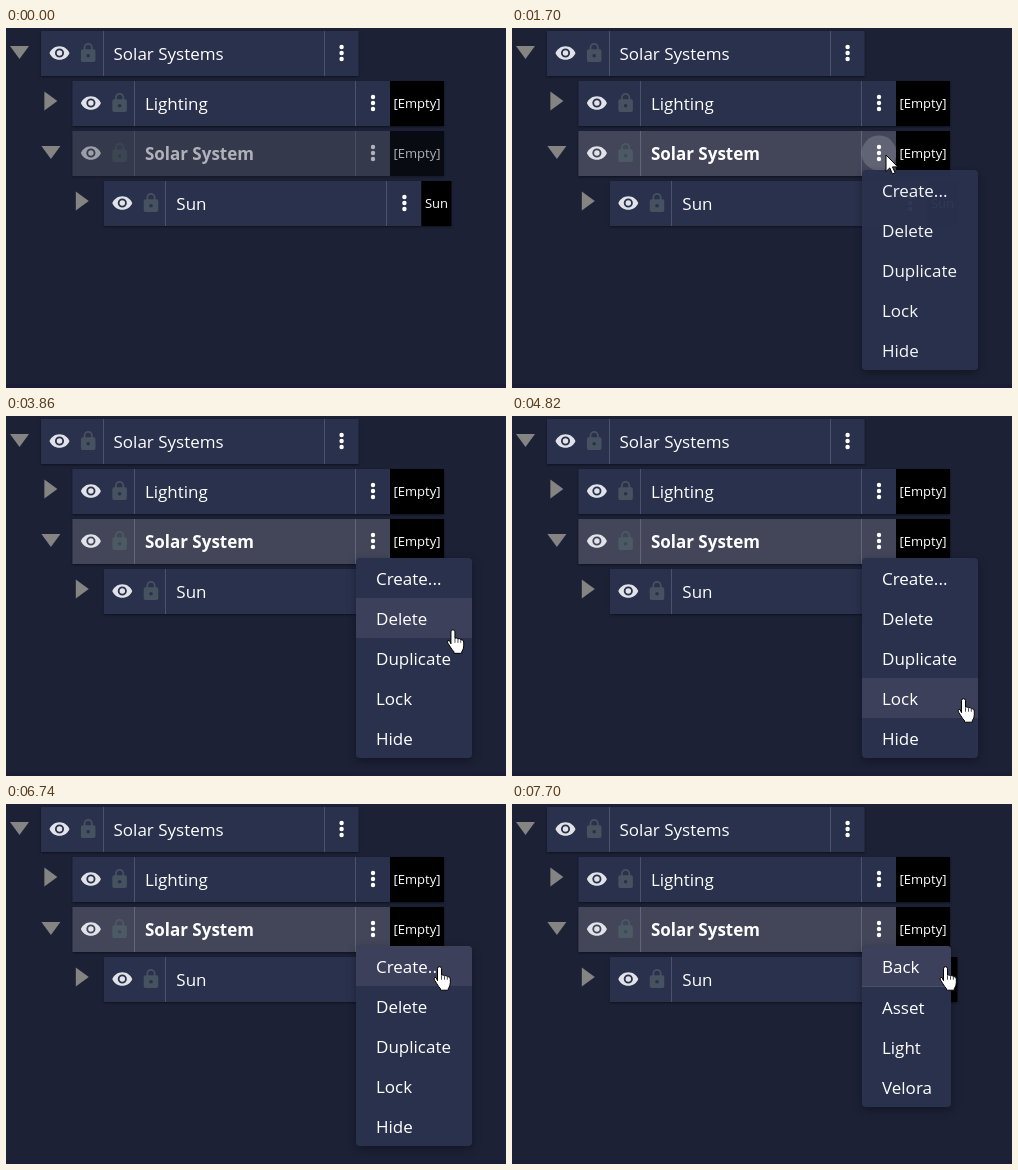
Animation, 500 px wide and 360 px high, one loop 8000 ms. Source, as an HTML page:

```html
<!DOCTYPE html>
<html lang="en">
<head>
<meta charset="utf-8">
<title>Scene tree menu</title>
<style>
html, body { margin: 0; width: 100%; height: 100%; overflow: hidden; background: #1c2136; }
svg { display: block; width: 500px; height: 360px; }
text { font: 500 17px "Open Sans", sans-serif; fill: #fff; white-space: pre; }
.bold { font-weight: 700; }
.tag { font-size: 13px; }
.row { filter: drop-shadow(0 1px 1px rgba(0, 0, 0, .45)); }
.menu { filter: drop-shadow(0 3px 4px rgba(0, 0, 0, .35)); }
.cursor path { fill: #fff; stroke: #000; stroke-linejoin: round; }
.cursor .lines { fill: none; stroke-width: .7; }
</style>
</head>
<body>
<svg id="stage" viewBox="0 0 500 360"></svg>
<script>
const LOOP = 8000, START = 500, STEP = 80;
const PANEL = '#2a314d', SELECTED = '#434659', HOVER = '#3c405a';
const ROW = { x: 35, y: 3, width: 317.6, height: 45, indent: 31.4, pitch: 50 };
const MENU = { x: 350, y: 142, item: 40 };

const EYE = 'M12 4.5C7 4.5 2.73 7.61 1 12c1.73 4.39 6 7.5 11 7.5s9.27-3.11 11-7.5c-1.73-4.39-6-7.5-11-7.5z' +
  'M12 17a5 5 0 1 1 0-10 5 5 0 0 1 0 10zM12 9a3 3 0 1 0 0 6 3 3 0 0 0 0-6z';
const LOCK = 'M18 8h-1V6A5 5 0 0 0 7 6v2H6a2 2 0 0 0-2 2v10a2 2 0 0 0 2 2h12a2 2 0 0 0 2-2V10a2 2 0 0 0-2-2z' +
  'M12 17a2 2 0 1 1 0-4 2 2 0 0 1 0 4zM15.1 8H8.9V6a3.1 3.1 0 0 1 6.2 0z';
const HAND = 'M-2 14V2a2 2 0 0 1 4 0V8.5q1.5-1 3 .6 1.7-.8 2.8.8 3-.4 3 2.3v4q0 3-2 5.8v1.5H1V22' +
  'q-2-2-4-5.5-2-3-2.5-4.2 0-2 2-1.6z';
const ARROW = 'M0 0V16.5l3.8-3.6 2.6 6 2.7-1.1-2.6-5.9h5.3z';

const rect = (x, y, w, h, fill, extra = '') =>
  `<rect x="${x}" y="${y}" width="${w}" height="${h}" fill="${fill}" ${extra}/>`;
const label = (x, y, text, cls = '') => `<text x="${x}" y="${y}" class="${cls}">${text}</text>`;
const icon = (d, cx, cy, fill) =>
  `<path d="${d}" fill="${fill}" fill-rule="evenodd" transform="translate(${cx} ${cy}) scale(.91) translate(-12 -12)"/>`;

function row({ depth, name, tag, tagWidth, open, selected }, index) {
  const x = ROW.x + depth * ROW.indent, right = x + ROW.width;
  const y = ROW.y + index * ROW.pitch, mid = y + 22;
  const line = selected ? '#626575' : '#4c526c';
  const divider = at => rect(Math.floor(at), y, 1, ROW.height, line);
  const arrow = open ? 'M-9.5-6.5h19L0 6.5z' : 'M-6.5-9.5v19L6.5 0z';
  const dots = [-6, 0, 6].map(d => `<circle cx="${right - 17}" cy="${mid + d}" r="2.2" fill="#fff"/>`);
  return `<path d="${arrow}" transform="translate(${x - 21.5} ${mid - (open ? .5 : 2)})" fill="#848482"/>` +
    `<g class="row" ${selected ? 'id="selected"' : ''}>` +
    rect(x, y, ROW.width, ROW.height, selected ? SELECTED : PANEL) +
    divider(x + 62) + divider(right - 34.6) +
    icon(EYE, x + 18.5, mid, '#e1e3e8') +
    icon(LOCK, x + 47.2, mid, selected ? '#4c5a63' : '#46525f') +
    (selected ? `<circle id="ripple" cx="${right - 17}" cy="${mid}" fill="#fff"/>` : '') +
    dots.join('') +
    label(x + 72.5, y + 29, name, selected ? 'bold' : '') +
    (tag ? rect(right, y, tagWidth, ROW.height, '#000') + label(right + 3.5, y + 27, tag, 'tag') : '') +
    '</g>';
}

function menu(id, width, names, divider = 0) {
  const { x, y, item } = MENU;
  const height = names.length * item + divider;
  return `<g class="menu" id="${id}">` +
    rect(x, y, width, height, PANEL, 'rx="4"') +
    `<g clip-path="url(#${id}Clip)">` + rect(x, y, width, item, HOVER, `id="${id}Hover"`) +
    (divider ? rect(x, y + item, width, 1, '#4b5069') : '') + '</g>' +
    `<clipPath id="${id}Clip">${rect(x, y, width, height, '#fff', 'rx="4"')}</clipPath>` +
    names.map((n, i) => label(x + 20, y + 27 + i * item + (i ? divider : 0), n)).join('') + '</g>';
}

const rows = [
  { depth: 0, name: 'Solar Systems', open: true },
  { depth: 1, name: 'Lighting', tag: '[Empty]', tagWidth: 54 },
  { depth: 1, name: 'Solar System', tag: '[Empty]', tagWidth: 54, open: true, selected: true },
  { depth: 2, name: 'Sun', tag: 'Sun', tagWidth: 30 }
];

const stage = document.getElementById('stage');
stage.innerHTML =
  rect(0, 0, 500, 360, '#1c2136') + rect(0, 356, 500, 4, '#1b1d37') +
  rows.map(row).join('') +
  menu('main', 116, ['Create...', 'Delete', 'Duplicate', 'Lock', 'Hide']) +
  menu('sub', 89, ['Back', 'Asset', 'Light', 'Velora'], 1) +
  `<clipPath id="firstItem">${rect(MENU.x, MENU.y, 116, MENU.item, '#fff')}</clipPath>
   <g clip-path="url(#firstItem)"><circle id="press" cx="434" cy="162" fill="#fff"/></g>
   <circle id="click" r="14" fill="#e1d714"/>
   <g class="cursor" id="cursor">
     <path id="arrow" d="${ARROW}"/>
     <g id="hand"><g transform="translate(-.5 -1.3)">
       <path d="${HAND}"/><path class="lines" d="M2 9v4M5 9.6v3.4M7.8 10.4v2.6"/>
     </g></g>
   </g>`;

const entry = { x: 510, y: 122 };
const moves = [
  { from: 420, to: 1140, x: 374, y: 127 },   // row's menu button
  { from: 2100, to: 2340, x: 439, y: 169 },  // Create
  { from: 2820, to: 3140, x: 447, y: 199 },  // Delete
  { from: 3700, to: 4100, x: 448, y: 235 },  // Duplicate
  { from: 4580, to: 4820, x: 452, y: 284 },  // Lock
  { from: 5060, to: 5620, x: 447, y: 324 },  // Hide
  { from: 6100, to: 6580, x: 404, y: 170 },  // back up to Create
  { from: 6580, to: 6740, x: 434, y: 164 }
];

const ramp = (t, from, to) => Math.min(1, Math.max(0, (t - from) / (to - from)));
const easeOut = p => Math.sin(p * Math.PI / 2);
const settle = p => p * (1.2 - .2 * p);
const flash = (t, peak) => .7 * Math.max(0, 1 - Math.abs(t - peak) / 100);

function cursorAt(t) {
  return moves.reduce((pos, move) => {
    const p = settle(ramp(t, move.from, move.to));
    return { x: pos.x + (move.x - pos.x) * p, y: pos.y + (move.y - pos.y) * p };
  }, entry);
}

const set = (id, attrs) => {
  const el = document.getElementById(id);
  for (const key in attrs) el.setAttribute(key, attrs[key]);
};

function draw(t) {
  const { x, y } = cursorAt(t);
  const menuOpen = t >= 1380;
  const pointing = menuOpen ? y >= MENU.y : x < 384;
  const hovered = Math.floor((y - MENU.y) / MENU.item);

  set('selected', { opacity: .65 + .35 * ramp(t, 740, 980) });
  set('ripple', {
    r: 17.5 * ramp(t, 1140, 1300),
    'fill-opacity': .16 * (ramp(t, 1140, 1380) - ramp(t, 1700, 2100))
  });
  set('press', { r: 34 * ramp(t, 6980, 7220), 'fill-opacity': .12 * (1 - ramp(t, 7140, 7300)) });
  set('click', { cx: x, cy: y - 1, opacity: flash(t, 1220) + flash(t, 7060) });
  set('main', { opacity: easeOut(ramp(t, 1300, 1780)) - ramp(t, 7220, 7380) });
  set('sub', { opacity: easeOut(ramp(t, 7220, 7460)) });
  set('mainHover', { y: MENU.y + hovered * MENU.item, opacity: menuOpen && hovered >= 0 ? 1 : 0 });
  set('subHover', { opacity: t >= 7700 ? 1 : 0 });
  set('cursor', { transform: `translate(${x} ${y})` });
  set('arrow', { opacity: pointing ? 0 : 1 });
  set('hand', { opacity: pointing ? 1 : 0 });
}

const origin = performance.now();
function tick(now) {
  const t = Math.max(0, now - origin) % LOOP;
  draw(t < START ? 0 : START + Math.floor((t - START) / STEP) * STEP);
  requestAnimationFrame(tick);
}
draw(0);
requestAnimationFrame(tick);
</script>
</body>
</html>
```
